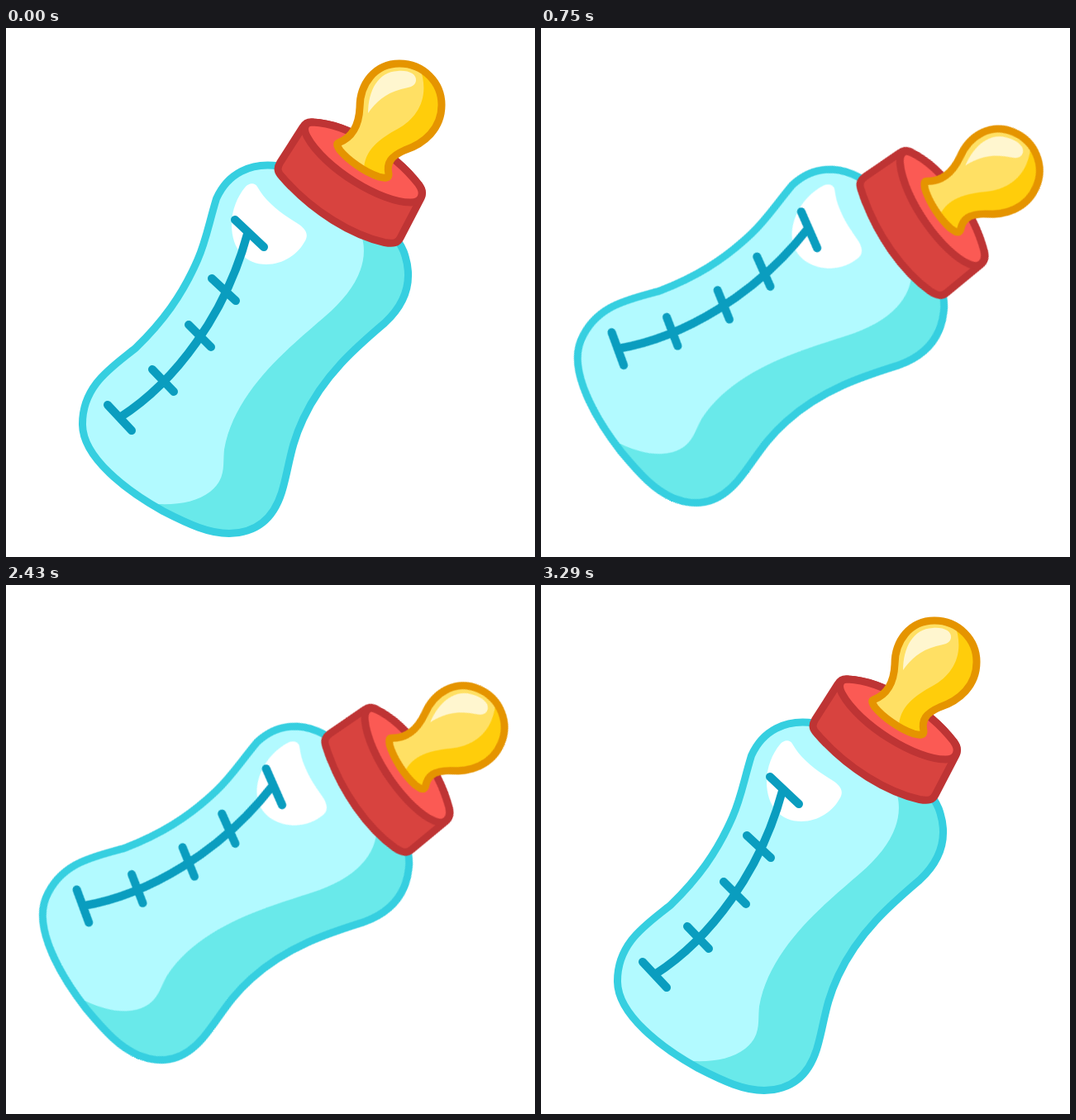
An HTML page that plays this animation: 640x640 px, repeating every 3330 ms.

```html
<!DOCTYPE html>
<html lang="en">
<head>
<meta charset="utf-8">
<title>Baby bottle</title>
<style>
  html, body { margin: 0; width: 100%; height: 100%; overflow: hidden; background: #fff; }
  svg { display: block; width: 100vw; height: 100vh; }
  #bottle { transform-origin: 320px 320px; }
  .line { fill: none; stroke-linecap: round; stroke-linejoin: round; }
</style>
</head>
<body>
<svg viewBox="0 0 640 640">
  <defs>
    <path id="body" d="M330 167C296 162 268 176 254.5 206.5C245 238 242 257 232 280C213 324 189 356 157 387
      C129 410 92 432 92.5 480C93 520 146 560 190 584.5C222 601 246 611.5 270 611.5C305 611 324 592 333.5 562
      C343 531 343 508 359.5 473C384 420 425 385 458 357C484 333 492 306 483 276C480 265 474 257 470 252Z"/>
    <path id="teat" d="M402 139C418 133 427 119 428 96C428 68 446 43 476 43C505 43 527 66 527 93
      C527 122 506 140 482 148C466 155 460 163 463 177C463 182 459 182 451 180
      C433 174 413 159 404 148C400 142 400 140 402 139Z"/>
    <clipPath id="inBody"><use href="#body"/></clipPath>
    <clipPath id="inTeat"><use href="#teat"/></clipPath>
  </defs>
  <g id="bottle">
    <!-- glass -->
    <use href="#body" fill="#b2faff"/>
    <path clip-path="url(#inBody)" fill="#69e9ea" d="M431 254C440 290 416 323 387 348C346 384 277 437 264 510
      C262 528 267 545 247 561C231 573 210 577 184 576L190 640H520V240Z"/>
    <use href="#body" class="line" stroke="#36cfe0" stroke-width="9"/>
    <path fill="#fff" d="M289 193C294 187 301 187 304 192C314 210 332 224 352 236C363 243 367 250 361 259
      C352 275 334 286 315 286C290 286 273 268 273 238C273 220 280 204 289 193Z"/>
    <!-- scale -->
    <path class="line" stroke="#0a9dbf" stroke-width="10" d="M292 249C266 346 205 428 138 471
      M277 232L312 265M249 303L278 330M221 359L248 386M177 413L203 440M123 456L152 487"/>
    <!-- cap -->
    <g stroke="#be3434" stroke-width="9" stroke-linejoin="round">
      <path fill="#d8433f" d="M372 114C366 113 362 115 359 120L331.5 163C327.5 170 328.5 174 333.5 179.5
        C371 223 420 251 458 259.5C469 261.5 474 260 477 254L502 206C505 200 504 195 499 189
        C470 152 415 116 372 114Z"/>
      <path fill="#fb5a54" d="M371 114C415 116 470 152 499 189C507 200 503 211 490 211
        C455 212 385 170 364 131C359 121 362 114 371 114Z"/>
    </g>
    <!-- teat -->
    <use href="#teat" fill="#ffcd0b"/>
    <path clip-path="url(#inTeat)" fill="#ffe064" d="M498 40L500 46C514 82 499 108 474 122C452 134 433 148 433 172
      L425 190H380V40Z"/>
    <path fill="#fff6cf" d="M438 103C438 76 450 53 474 52C488 51 497 56 496 64C495 71 487 72 478 74
      C459 79 447 90 438 103Z"/>
    <use href="#teat" class="line" stroke="#e59400" stroke-width="9"/>
  </g>
</svg>
<script>
  const LOOP = 3330, FPS = 28, TILT = 23;

  const ease = (t, from, to) => {
    const s = Math.min(1, Math.max(0, (t - from) / (to - from)));
    return s * s * (3 - 2 * s);
  };
  const angle = t => TILT * (ease(t, 0, 714) - ease(t, 2403, 3153));

  // The pose holds between ticks, which fall on whole 10 ms.
  const frames = [];
  for (let k = 0; k < 93; k++) {
    const t = k * 1000 / FPS;
    frames.push({
      offset: Math.round(t / 10) * 10 / LOOP,
      transform: `rotate(${angle(t).toFixed(3)}deg)`,
      easing: 'steps(1, end)'
    });
  }
  frames.push({ offset: 1, transform: 'rotate(0deg)' });

  document.getElementById('bottle').animate(frames, { duration: LOOP, iterations: Infinity });
</script>
</body>
</html>
```
